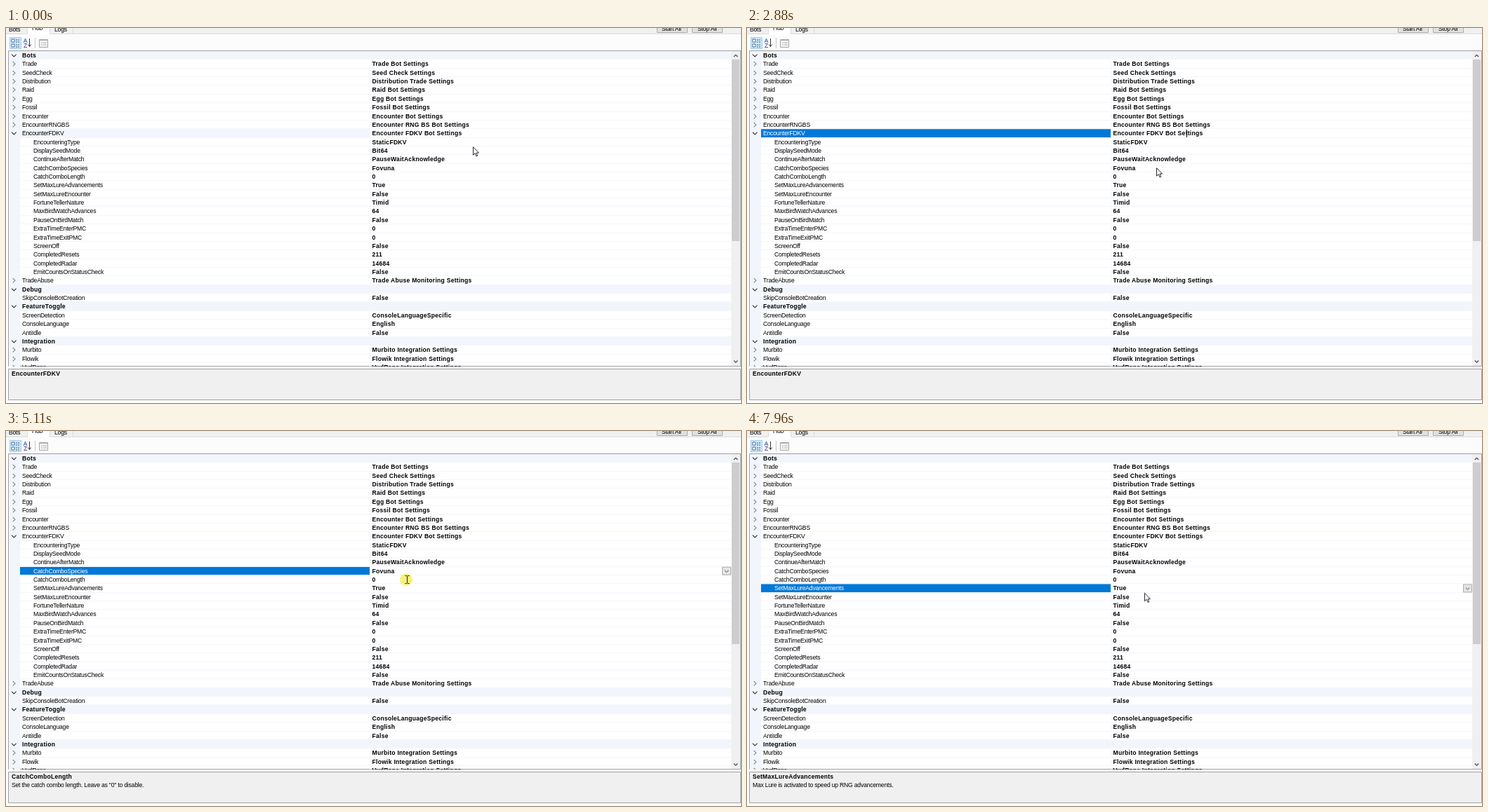
Recreate the animation shown at these times as an HTML page. Size 1047 by 535 pixels, loop 8 s.

```html
<!DOCTYPE html>
<html lang="en">
<head>
<meta charset="utf-8">
<title>Settings grid</title>
<style>
:root { --h: 12.36px; --tint: #f2f6fc; }
html, body { margin: 0; width: 100%; height: 100%; overflow: hidden; background: #fff; }
body {
  position: relative;
  font: 8.6px/12.36px "Liberation Sans", Arial, sans-serif;
  letter-spacing: -.2px; color: #000; white-space: pre;
}
b { letter-spacing: .25px; }
div, span, b, svg { position: absolute; }
svg { overflow: visible; }

#grid { left: 4px; top: 33px; width: 1029px; height: 449.5px; overflow: hidden; }
#margin { left: 0; top: 0; width: 16px; height: 100%; background: var(--tint); }
#split { left: 514px; top: 0; width: 1px; height: 100%; background: var(--tint); }
.row { left: 0; width: 1029px; height: var(--h); }
.row::after { content: ""; position: absolute; left: 16px; right: 0; bottom: 0; height: 1px; background: var(--tint); }
.row.cat { background: var(--tint); z-index: 1; }
.row > span, .row > b { left: 19px; }
.row > .child { left: 35px; }
.row > .value { left: 517.5px; }

/* every track shares one 8 s clock */
#bar, #drop, #caret, #ring, #mouse, #arrow, #beam, .lit, .help { animation: 8s step-end infinite; }

#bar { left: 16px; top: 0; width: 498px; height: 12px; animation-name: bar; }
@keyframes bar {
  0% { transform: translateY(calc(var(--h) * 9)); background: var(--tint); }
  16.25% { transform: translateY(calc(var(--h) * 9)); background: #0078d7; }
  40.75% { transform: translateY(calc(var(--h) * 13)); background: #0078d7; }
  64.75% { transform: translateY(calc(var(--h) * 14)); background: #0078d7; }
  90.875%, 100% { transform: translateY(calc(var(--h) * 15)); background: #0078d7; }
}
@keyframes lit9 { 0% { color: #000 } 16.25% { color: #fff } 40.75%, 100% { color: #000 } }
@keyframes lit13 { 0% { color: #000 } 40.75% { color: #fff } 64.75%, 100% { color: #000 } }
@keyframes lit14 { 0% { color: #000 } 64.75% { color: #fff } 90.875%, 100% { color: #000 } }
@keyframes lit15 { 0% { color: #000 } 90.875%, 100% { color: #fff } }

#drop { left: 1016px; top: 0; width: 13px; height: 12px; animation-name: drop; }
@keyframes drop {
  0% { transform: translateY(-20px); }
  40.75% { transform: translateY(calc(var(--h) * 13)); }
  64.75% { transform: translateY(-20px); }
  90.875%, 100% { transform: translateY(calc(var(--h) * 15)); }
}

#caret { left: 0; top: 0; width: 1px; height: 10.5px; background: #000; animation-name: caret; }
@keyframes caret {
  0% { opacity: 0; }
  16.25% { opacity: 1; transform: translate(626px, 145px); }
  23.375% { opacity: 0; }
  30% { opacity: 1; transform: translate(626px, 145px); }
  40.75% { opacity: 1; transform: translate(553px, 194.5px); }
  47.625% { opacity: 0; }
  54.25% { opacity: 1; transform: translate(553px, 194.5px); }
  60.875% { opacity: 0; }
  64.75% { opacity: 1; transform: translate(527px, 207px); }
  70.5% { opacity: 0; }
  83.125% { opacity: 1; transform: translate(527px, 207px); }
  90% { opacity: 0; }
  90.875% { opacity: 1; transform: translate(541px, 219.5px); }
  98.5%, 100% { opacity: 0; }
}

#mouse { left: 0; top: 0; animation-name: move; }
@keyframes move {
  0% { transform: translate(665px, 169px); }
  .875% { transform: translate(665px, 169px); animation-timing-function: steps(3, jump-start); }
  3.5% { transform: translate(627px, 149px); }
  4.75% { transform: translate(627px, 150px); }
  8.5% { transform: translate(627px, 149.5px); }
  9.5% { transform: translate(627px, 149px); }
  27.375% { transform: translate(627px, 149px); animation-timing-function: steps(10, jump-start); }
  36.9583% { transform: translate(583px, 199px); }
  51.375% { transform: translate(583px, 199px); animation-timing-function: steps(5, jump-start); }
  56.1875% { transform: translate(572px, 207px); animation-timing-function: steps(6, jump-start); }
  61.9625% { transform: translate(570px, 211px); }
  74.5% { transform: translate(570px, 211px); animation-timing-function: steps(4, jump-start); }
  78.15% { transform: translate(565.5px, 221.5px); animation-timing-function: steps(2, jump-start); }
  79.975% { transform: translate(567px, 223px); }
  97.5% { transform: translate(566.6px, 225.5px); }
  98.5% { transform: translate(566.3px, 228px); }
  99.5%, 100% { transform: translate(566px, 230.5px); }
}
#arrow { animation-name: arrow; }
#beam { animation-name: beam; }
@keyframes arrow {
  0%, 28.34%, 56% , 76.325%, 99.5%, 100% { opacity: 1; }
  15.375%, 40.75%, 51.375%, 63.875%, 90% { opacity: 0; }
}
@keyframes beam {
  0%, 28.34%, 56%, 76.325%, 99.5%, 100% { opacity: 0; }
  15.375%, 40.75%, 51.375%, 63.875%, 90% { opacity: 1; }
}

#ring {
  left: -9px; top: -8.5px; width: 18px; height: 18px; border-radius: 50%;
  background: #f7ec5e; opacity: 0; animation-name: ring;
}
@keyframes ring {
  0%, 17.5%, 42.625%, 65.75%, 91.625%, 100% { opacity: 0; }
  15.375%, 40.75%, 63.875%, 90% { opacity: .8; }
}

.help { left: 8px; top: 487px; }
.help span { left: 0; top: 12.2px; }
#help1 { animation-name: help1; }
#help2 { animation-name: help2; }
#help3 { animation-name: help3; }
#help4 { animation-name: help4; }
@keyframes help1 { 0% { opacity: 1 } 40.75%, 100% { opacity: 0 } }
@keyframes help2 { 0% { opacity: 0 } 40.75% { opacity: 1 } 63.875%, 100% { opacity: 0 } }
@keyframes help3 { 0% { opacity: 0 } 63.875% { opacity: 1 } 90%, 100% { opacity: 0 } }
@keyframes help4 { 0% { opacity: 0 } 90%, 100% { opacity: 1 } }
</style>
</head>
<body>
<svg width="1047" height="535" style="left:0;top:0" fill="none">
  <!-- tabs and buttons -->
  <path d="M0 0H1047V8H0Z" fill="#f0f0f0"/>
  <path d="M0 8.5H30.5V0M62.5 0V8.5H1047M95.5 0V8" stroke="#dcdcdc"/>
  <path d="M31 0H62V9H31Z" fill="#fff"/>
  <path d="M927.5 -5H970.5V6.5H927.5ZM977.5 -5H1020.5V6.5H977.5Z" fill="#e1e1e1" stroke="#adadad"/>
  <!-- toolbar -->
  <path d="M0 10H1047V32H0Z" fill="#fcfcfc"/>
  <path d="M5.5 13.5H21.5V29.5H5.5Z" fill="#cce6fa" stroke="#9fd0f5"/>
  <path d="M8 16h4v4h-4zM8 23h4v4h-4z" fill="#fff" stroke="#4d6f96"/>
  <path d="M14 17h2m1 0h2M14 20h2m1 0h2M14 24h2m1 0h2M14 27h2m1 0h2" stroke="#44546a"/>
  <path d="M25 21l2.5-6 2.5 6M26 19h3" stroke="#2f6db5"/>
  <path d="M25.5 22.5h4l-4 5h4.5" stroke="#7a4a9a"/>
  <path d="M33.5 15v11M31.3 23.5l2.2 3 2.2-3" stroke="#333"/>
  <path d="M41.5 14V29" stroke="#c8c8c8"/>
  <path d="M47.5 16.5h12v11h-12z" fill="#f4f4f4" stroke="#a8a8a8"/>
  <path d="M47 17.5h13M50 21h2m1 0h5M50 24h2m1 0h5" stroke="#b0b0b0"/>
  <!-- panes -->
  <path d="M3.5 32.5H1046.5V482.5H3.5Z" fill="#fff" stroke="#a0a0a0"/>
  <path d="M3.5 486.5H1046.5V530.5H3.5Z" fill="#f0f0f0" stroke="#a0a0a0"/>
  <!-- scrollbar -->
  <path d="M1033 33H1046V482H1033Z" fill="#f0f0f0"/>
  <path d="M1034 45H1045V304H1034Z" fill="#cdcdcd"/>
  <path d="M1036.8 41l2.7-2.7 2.7 2.7M1036.8 474.5l2.7 2.7 2.7-2.7" stroke="#505050" stroke-width="1.3"/>
</svg>
<span style="left:4px;top:-4.5px">Bots</span>
<span style="left:37px;top:-6px">Hub</span>
<span style="left:69px;top:-4.5px">Logs</span>
<span style="left:934px;top:-5.5px">Start All</span>
<span style="left:985px;top:-5.5px">Stop All</span>

<div id="grid">
  <div id="margin"></div><div id="split"></div><div id="bar"></div>
  <svg id="drop" viewBox="0 0 13 12" fill="none">
    <path d="M.5 .5h12v11h-12z" fill="#e5e5e5" stroke="#adadad"/>
    <path d="M3.7 5l2.8 2.8L9.3 5" stroke="#444"/>
  </svg>
</div>

<div class="help" id="help1"><b>EncounterFDKV</b></div>
<div class="help" id="help2"><b>CatchComboSpecies</b><span>Select the catch combo species.</span></div>
<div class="help" id="help3"><b>CatchComboLength</b><span>Set the catch combo length. Leave as "0" to disable.</span></div>
<div class="help" id="help4"><b>SetMaxLureAdvancements</b><span>Max Lure is activated to speed up RNG advancements.</span></div>

<div id="caret"></div>
<div id="mouse">
  <div id="ring"></div>
  <svg id="arrow" width="9" height="15" style="left:0;top:0">
    <path d="M.5 .7V12.2L3.2 9.7L5.1 14L6.8 13.2L5 9.1H8.5Z" fill="#fff" stroke="#000" stroke-width=".85"/>
  </svg>
  <svg id="beam" width="7" height="12" style="left:-2px;top:-5px" fill="none">
    <path d="M.5 .5H2.7L3.5 1.2L4.3 .5H6.5M3.5 1V11M.5 11.5H2.7L3.5 10.8L4.3 11.5H6.5" stroke="#222"/>
  </svg>
</div>

<script>
// Prefix: # category, > collapsed, v expanded, + child, - plain entry
const rows = `#Bots
>Trade|Trade Bot Settings
>SeedCheck|Seed Check Settings
>Distribution|Distribution Trade Settings
>Raid|Raid Bot Settings
>Egg|Egg Bot Settings
>Fossil|Fossil Bot Settings
>Encounter|Encounter Bot Settings
>EncounterRNGBS|Encounter RNG BS Bot Settings
vEncounterFDKV|Encounter FDKV Bot Settings
+EncounteringType|StaticFDKV
+DisplaySeedMode|Bit64
+ContinueAfterMatch|PauseWaitAcknowledge
+CatchComboSpecies|Fovuna
+CatchComboLength|0
+SetMaxLureAdvancements|True
+SetMaxLureEncounter|False
+FortuneTellerNature|Timid
+MaxBirdWatchAdvances|64
+PauseOnBirdMatch|False
+ExtraTimeEnterPMC|0
+ExtraTimeExitPMC|0
+ScreenOff|False
+CompletedResets|211
+CompletedRadar|14684
+EmitCountsOnStatusCheck|False
>TradeAbuse|Trade Abuse Monitoring Settings
#Debug
-SkipConsoleBotCreation|False
#FeatureToggle
-ScreenDetection|ConsoleLanguageSpecific
-ConsoleLanguage|English
-AntiIdle|False
#Integration
>Murbito|Murbito Integration Settings
>Flowik|Flowik Integration Settings
>VudRane|VudRane Integration Settings`.split("\n");

const selectable = [9, 13, 14, 15];
const chevron = (d, color) =>
  `<svg width="16" height="12" style="left:0;top:0"><path d="${d}" fill="none" stroke="${color}" stroke-width="1.1"/></svg>`;
const closed = chevron("M5.7 3L9 6.2L5.7 9.4", "#858585");
const open = chevron("M4 4.6L7.3 7.9L10.6 4.6", "#333");

function rowHtml(line, i) {
  const kind = line[0];
  const [name, value = ""] = line.slice(1).split("|");
  const icon = kind === ">" ? closed : "#v".includes(kind) ? open : "";
  const lit = selectable.includes(i) ? ` lit" style="animation-name:lit${i}` : "";
  const label = kind === "#"
    ? `<b>${name}</b>`
    : `<span class="${kind === "+" ? "child" : "top"}${lit}">${name}</span>`;
  return `<div class="row${kind === "#" ? " cat" : ""}" style="top:calc(var(--h) * ${i})">` +
    `${icon}${label}<b class="value">${value}</b></div>`;
}

document.getElementById("drop").insertAdjacentHTML("beforebegin", rows.map(rowHtml).join(""));
</script>
</body>
</html>
```
